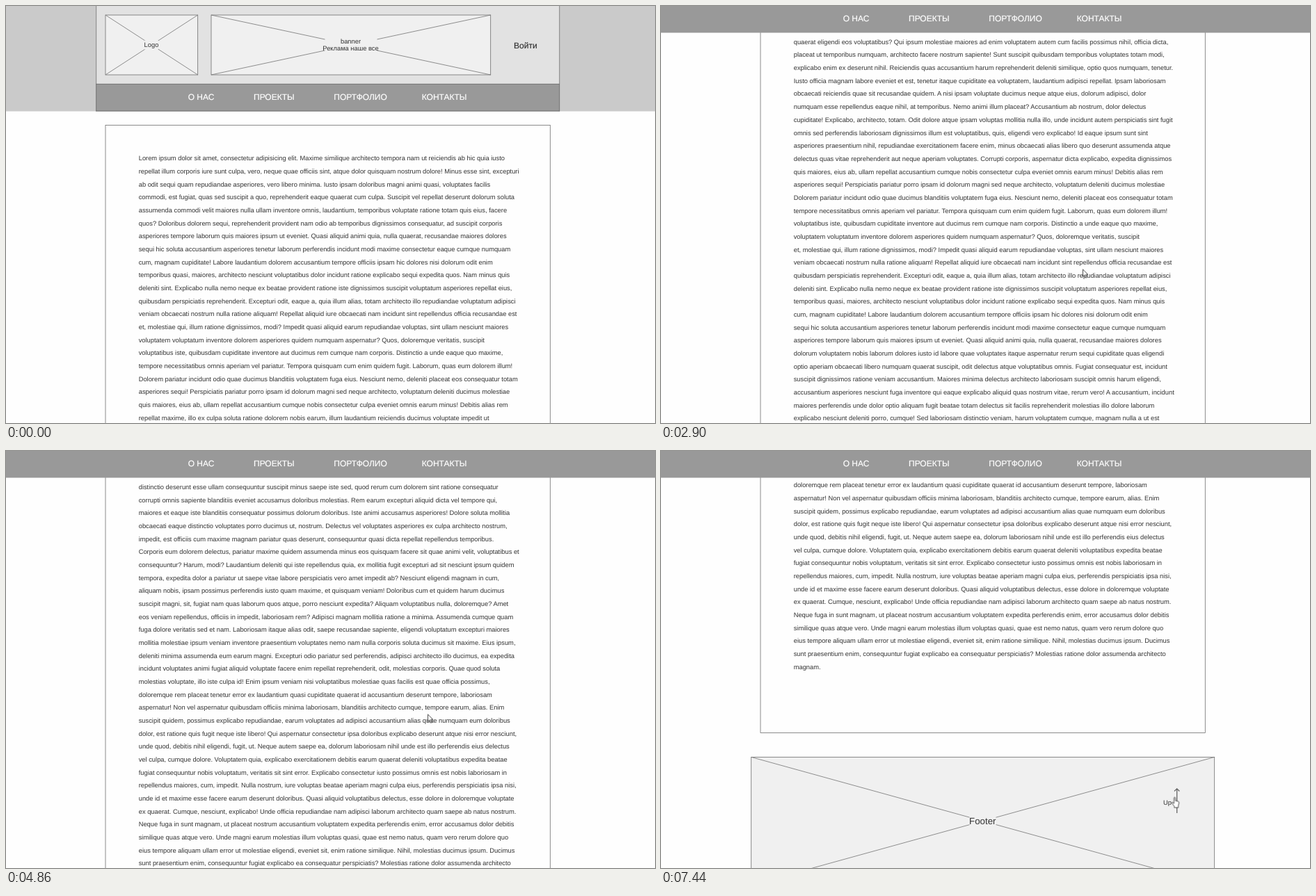
These frames come from a looping animation (933x600 px, 8 s). An HTML page:

```html
<!DOCTYPE html>
<html lang="ru">
<head>
<meta charset="utf-8">
<title>Sticky menu</title>
<style>
html, body { margin: 0; width: 100%; height: 100%; overflow: hidden; background: #fefefe; }
body { position: relative; font: 9.333px "Liberation Sans", Arial, sans-serif; color: #333; text-rendering: geometricPrecision; }
#page, #menu, #cursor, svg, .text { position: absolute; left: 0; }
#page { top: 0; width: 933px; height: 2900px; animation: scroll 8s infinite; }
.text { left: 190.7px; top: 210.35px; }
pre { margin: 0; font: inherit; line-height: 18.6667px; }
#menu { top: 0; animation: stick 8s step-end infinite; }
.wire { fill: #f0f0f0; }
.wire, .frame { stroke: #666; stroke-width: .75; }
.frame { fill: none; }
.diag { fill: none; stroke: #7b7b7b; stroke-width: .85; }
.mask { fill: #f0f0f0; }
.mid { text-anchor: middle; }
text { fill: #333; }
.nav text { fill: #fff; stroke: #fff; stroke-width: .2; font-size: 12px; }
#cursor { top: 0; animation: move 8s infinite; }
#cursor svg { top: 0; overflow: visible; fill: #fff; stroke: #222; stroke-width: .8; }
#arrow { animation: arrow 8s step-end infinite; }
#beam { animation: beam 8s step-end infinite; }
#hand { animation: hand 8s step-end infinite; }

@keyframes scroll {
  0% { top: 0; }
  24.125% { top: 0; animation-timing-function: steps(3, start); }
  29% { top: -203.33px; }
  29.75% { top: -203.33px; animation-timing-function: steps(4, start); }
  34.583% { top: -503.33px; }
  36.25% { top: -503.33px; animation-timing-function: steps(2, start); }
  39.5% { top: -653.33px; }
  39.75% { top: -653.33px; animation-timing-function: steps(4, start); }
  44.083% { top: -953.33px; }
  45.125% { top: -953.33px; animation-timing-function: step-start; }
  46.1% { top: -1028px; animation-timing-function: steps(6, start); }
  51.975% { top: -1430px; }
  54.25% { top: -1430px; animation-timing-function: step-start; }
  55.125% { top: -1497.33px; animation-timing-function: step-start; }
  57.125% { top: -1590px; animation-timing-function: step-start; }
  59% { top: -1682px; animation-timing-function: steps(3, start); }
  61.625% { top: -1960px; }
  64.375% { top: -1960px; animation-timing-function: steps(5, start); }
  70.78%, 100% { top: -2261.33px; }
}
@keyframes stick { 0% { opacity: 0; } 25.75%, 100% { opacity: 1; } }
@keyframes move {
  0% { transform: translate(940px, 620px); animation-timing-function: step-end; }
  1.75% { transform: translate(893px, 584px); animation-timing-function: steps(4); }
  4% { transform: translate(783px, 475px); }
  7% { transform: translate(783px, 475px); animation-timing-function: steps(7, start); }
  9.625% { transform: translate(934px, 414px); }
  17.375% { transform: translate(934px, 414px); animation-timing-function: steps(9, start); }
  23.125% { transform: translate(606px, 378.5px); }
  74.5% { transform: translate(606px, 378.5px); animation-timing-function: steps(7); }
  77.125% { transform: translate(668px, 462px); animation-timing-function: steps(8); }
  79.75% { transform: translate(710.5px, 513px); animation-timing-function: steps(3); }
  80.875% { transform: translate(716px, 515px); animation-timing-function: steps(9); }
  84.125% { transform: translate(735px, 500px); }
  84.625% { transform: translate(735px, 500px); animation-timing-function: steps(3); }
  85.625% { transform: translate(742px, 482px); animation-timing-function: steps(9); }
  88.75% { transform: translate(699px, 508px); animation-timing-function: steps(7); }
  91.25% { transform: translate(722px, 506px); animation-timing-function: steps(5); }
  93%, 100% { transform: translate(738.5px, 497.5px); }
}
@keyframes arrow {
  0%, 29.75%, 86.625% { opacity: 1; }
  20.625%, 83%, 91.25%, 100% { opacity: 0; }
}
@keyframes beam { 0%, 29.75%, 100% { opacity: 0; } 20.625% { opacity: 1; } }
@keyframes hand { 0%, 86.625% { opacity: 0; } 83%, 91.25%, 100% { opacity: 1; } }
</style>
</head>
<body>
<div id="page">
  <svg width="933" height="2700" style="top:0">
    <path fill="#cacaca" d="M0 0H933V151.4H0Z"/>
    <path fill="#e2e2e2" d="M129.4 0H796V112H129.4Z"/>
    <path fill="#999" d="M129.4 112H796V151.4H129.4Z"/>
    <path class="frame" d="M129.7 0V151.4M795.7 0V151.4M129.4 112.3H796M129.4 151H796"/>
    <rect class="wire" x="143" y="13" width="132.7" height="86"/>
    <path class="diag" d="M143 13l132.7 86m0-86l-132.7 86"/>
    <path class="mask" d="M199 49.5h20v13h-20z"/>
    <text class="mid" x="209" y="59.2">Logo</text>
    <rect class="wire" x="295" y="13" width="401.7" height="86"/>
    <path class="diag" d="M295 13l401.7 86m0-86l-401.7 86"/>
    <path class="mask" d="M458.5 44h75v25h-75z"/>
    <text class="mid" x="495.5" y="54">banner</text>
    <text class="mid" x="495.5" y="64">Реклама наше все</text>
    <text x="730" y="61.2" font-size="12" stroke="#333" stroke-width=".15">Войти</text>
    <g class="nav" transform="translate(0 112.8)">
      <text x="261.7" y="22.4">О НАС</text><text x="356" y="22.4">ПРОЕКТЫ</text><text x="471.3" y="22.4">ПОРТФОЛИО</text><text x="597.7" y="22.4">КОНТАКТЫ</text>
    </g>
    <rect class="frame" x="143" y="171.6" width="639.3" height="2495"/>
  </svg>
  <div class="text">
<pre id="intro">
Lorem ipsum dolor sit amet, consectetur adipisicing elit. Maxime similique architecto tempora nam ut reiciendis ab hic quia iusto
repellat illum corporis iure sunt culpa, vero, neque quae officiis sint, atque dolor quisquam nostrum dolore! Minus esse sint, excepturi
ab odit sequi quam repudiandae asperiores, vero libero minima. Iusto ipsam doloribus magni animi quasi, voluptates facilis
commodi, est fugiat, quas sed suscipit a quo, reprehenderit eaque quaerat cum culpa. Suscipit vel repellat deserunt dolorum soluta
assumenda commodi velit maiores nulla ullam inventore omnis, laudantium, temporibus voluptate ratione totam quis eius, facere
quos? Doloribus dolorem sequi, reprehenderit provident nam odio ab temporibus dignissimos consequatur, ad suscipit corporis
asperiores tempore laborum quis maiores ipsum ut eveniet. Quasi aliquid animi quia, nulla quaerat, recusandae maiores dolores
sequi hic soluta accusantium asperiores tenetur laborum perferendis incidunt modi maxime consectetur eaque cumque numquam
cum, magnam cupiditate! Labore laudantium dolorem accusantium tempore officiis ipsam hic dolores nisi dolorum odit enim
temporibus quasi, maiores, architecto nesciunt voluptatibus dolor incidunt ratione explicabo sequi expedita quos. Nam minus quis
deleniti sint. Explicabo nulla nemo neque ex beatae provident ratione iste dignissimos suscipit voluptatum asperiores repellat eius,
quibusdam perspiciatis reprehenderit. Excepturi odit, eaque a, quia illum alias, totam architecto illo repudiandae voluptatum adipisci
veniam obcaecati nostrum nulla ratione aliquam! Repellat aliquid iure obcaecati nam incidunt sint repellendus officia recusandae est
et, molestiae qui, illum ratione dignissimos, modi? Impedit quasi aliquid earum repudiandae voluptas, sint ullam nesciunt maiores
voluptatem voluptatum inventore dolorem asperiores quidem numquam aspernatur? Quos, doloremque veritatis, suscipit
voluptatibus iste, quibusdam cupiditate inventore aut ducimus rem cumque nam corporis. Distinctio a unde eaque quo maxime,
tempore necessitatibus omnis aperiam vel pariatur. Tempora quisquam cum enim quidem fugit. Laborum, quas eum dolorem illum!
Dolorem pariatur incidunt odio quae ducimus blanditiis voluptatem fuga eius. Nesciunt nemo, deleniti placeat eos consequatur totam
asperiores sequi! Perspiciatis pariatur porro ipsam id dolorum magni sed neque architecto, voluptatum deleniti ducimus molestiae
quis maiores, eius ab, ullam repellat accusantium cumque nobis consectetur culpa eveniet omnis earum minus! Debitis alias rem
repellat maxime, illo ex culpa soluta ratione dolorem nobis earum, illum laudantium reiciendis ducimus voluptate impedit ut
reprehenderit eum tempore, quasi aut facilis corrupti. Dolorum omnis, ab incidunt natus adipisci, deleniti iste praesentium et, in
quaerat eligendi eos voluptatibus? Qui ipsum molestiae maiores ad enim voluptatem autem cum facilis possimus nihil, officia dicta,
placeat ut temporibus numquam, architecto facere nostrum sapiente! Sunt suscipit quibusdam temporibus voluptates totam modi,
explicabo enim ex deserunt nihil. Reiciendis quas accusantium harum reprehenderit deleniti similique, optio quos numquam, tenetur.
Iusto officia magnam labore eveniet et est, tenetur itaque cupiditate ea voluptatem, laudantium adipisci repellat. Ipsam laboriosam
obcaecati reiciendis quae sit recusandae quidem. A nisi ipsam voluptate ducimus neque atque eius, dolorum adipisci, dolor
numquam esse repellendus eaque nihil, at temporibus. Nemo animi illum placeat? Accusantium ab nostrum, dolor delectus
cupiditate! Explicabo, architecto, totam. Odit dolore atque ipsam voluptas mollitia nulla illo, unde incidunt autem perspiciatis sint fugit
omnis sed perferendis laboriosam dignissimos illum est voluptatibus, quis, eligendi vero explicabo! Id eaque ipsum sunt sint
asperiores praesentium nihil, repudiandae exercitationem facere enim, minus obcaecati alias libero quo deserunt assumenda atque
delectus quas vitae reprehenderit aut neque aperiam voluptates. Corrupti corporis, aspernatur dicta explicabo, expedita dignissimos
</pre>
<pre id="middle"></pre>
<pre>
dolorum voluptatem nobis laborum dolores iusto id labore quae voluptates itaque aspernatur rerum sequi cupiditate quas eligendi
optio aperiam obcaecati libero numquam quaerat suscipit, odit delectus atque voluptatibus omnis. Fugiat consequatur est, incidunt
suscipit dignissimos ratione veniam accusantium. Maiores minima delectus architecto laboriosam suscipit omnis harum eligendi,
accusantium asperiores nesciunt fuga inventore qui eaque explicabo aliquid quas nostrum vitae, rerum vero! A accusantium, incidunt
maiores perferendis unde dolor optio aliquam fugit beatae totam delectus sit facilis reprehenderit molestias illo dolore laborum
explicabo nesciunt deleniti porro, cumque! Sed laboriosam distinctio veniam, harum voluptatem cumque, magnam nulla a ut est
placeat. Provident optio nesciunt quaerat, maiores voluptate, dolorum dolor eius doloribus saepe deserunt, ab cum corporis hic
dignissimos. Odio id animi, eius commodi nihil numquam voluptas repellendus sequi et error corporis sunt rem eligendi ratione, vero
rerum veritatis aspernatur! Vero iusto vel praesentium, reiciendis earum doloremque molestias veritatis. Repellendus, dolor, odio?
Laudantium necessitatibus maiores ea harum vero, doloribus repellendus veritatis dolorum dolorem esse recusandae temporibus
praesentium quis hic, cumque officia. Cupiditate ipsam illo distinctio sit commodi dolores error animi rerum voluptas, necessitatibus
tenetur provident quas voluptates deleniti veritatis consequuntur incidunt omnis cum veniam expedita blanditiis molestiae atque ipsa!
Alias numquam deserunt ut perferendis ea officiis dignissimos, voluptas neque odio. Quisquam eaque rem, accusantium repellat
eos saepe mollitia fuga perspiciatis accusamus placeat possimus odit fugit quibusdam numquam cupiditate nam illum, id facere
fugiat praesentium dolore. Voluptatum architecto veniam blanditiis, iure nostrum explicabo excepturi consequuntur pariatur, sapiente
provident quam sit! Facere velit iure qui. Deleniti ipsam neque reprehenderit unde, architecto non nostrum eius ab, at, provident
delectus. Enim voluptate nostrum sunt corporis laudantium dolore distinctio soluta est nam veritatis odit laborum nihil natus, ipsam,
cumque! Eum molestias quod similique quidem consequatur expedita fugiat, mollitia consequuntur repudiandae voluptas itaque
maiores aliquam impedit hic assumenda natus qui quaerat sint nulla reiciendis sequi esse officia eos! Soluta perferendis dolor ut
quasi voluptates blanditiis incidunt vitae aperiam repudiandae, ex aliquid doloremque at non eligendi exercitationem iure neque, ab
debitis dignissimos harum. Accusamus dolor molestias repellat aspernatur esse ipsum exercitationem nemo tempora quisquam.
Ipsum blanditiis sunt id quam minus impedit qui cupiditate quas inventore doloribus, praesentium nesciunt, architecto dolorem
laboriosam maxime repellendus est, iusto. Sit quaerat quos excepturi quas voluptate ipsum minus unde voluptatum laborum.
Voluptatibus est illo quos voluptatem reiciendis praesentium, sapiente voluptate temporibus modi quasi voluptatum eum sequi
mollitia, tempore eveniet ipsam tempora quia animi. In, iure! Soluta et omnis at, neque modi laboriosam maiores! Dolorem possimus
a, aspernatur esse autem distinctio fuga totam doloribus reprehenderit numquam debitis dolores eaque corporis tenetur ad animi,
fugiat obcaecati ducimus ipsam minima suscipit deleniti quis aperiam maiores? Laudantium labore maiores quia, minima nemo
eaque ab veritatis fuga, veniam distinctio, deserunt aliquid corporis sed recusandae. Voluptates officia ut natus quasi neque unde
accusantium dolores, sapiente rerum porro consequuntur recusandae ipsum ad animi blanditiis iste adipisci est esse. Ipsum culpa
veritatis voluptates molestiae, delectus id accusamus voluptatem illum? Inventore ipsa maxime molestiae eveniet, soluta sunt
quidem recusandae molestias deleniti animi nam nihil quis totam fuga veniam, tempora quam cumque maiores repudiandae cum
adipisci doloremque quae! Ipsum quam, facere qui officiis. Eaque omnis nostrum quibusdam aut et molestias voluptas nobis ea iusto
atque molestiae, qui, modi porro consectetur ex inventore aspernatur soluta deserunt incidunt illo. Nam voluptatem saepe quisquam
veritatis cupiditate id magni, facere, reiciendis quo rem aspernatur officiis nulla obcaecati quaerat reprehenderit. Eveniet error odio
reiciendis modi magni libero et at, assumenda quae! Nemo, dolorum adipisci rem quis quidem natus voluptates, praesentium facere
perferendis temporibus exercitationem consequatur. Minus possimus dolorum esse quia accusantium consectetur mollitia beatae illo
fugit, ratione sint quod in debitis facere autem sequi! Velit, sequi, harum? Hic aperiam non, dicta ut reprehenderit a et atque odit
quisquam. Nostrum expedita animi molestias ex qui dolorem minus cumque mollitia, fuga quas, id sed perspiciatis ipsum debitis
maiores eum autem pariatur magni harum itaque vero vel laboriosam distinctio. Debitis pariatur, consectetur, eveniet architecto error
explicabo velit blanditiis optio harum nam praesentium iure necessitatibus incidunt minus commodi laudantium laborum soluta
aspernatur impedit voluptates temporibus, excepturi alias! Sunt vitae enim, ducimus culpa recusandae sapiente placeat eveniet,
quod architecto dolorem necessitatibus doloribus excepturi cumque nobis nam, eaque? Voluptatem harum voluptatum incidunt
doloribus quae quisquam tenetur voluptas debitis dolorum laboriosam, consectetur officia sint vero aperiam, fugiat reiciendis
voluptate, maxime ipsam nihil provident corporis sequi non a illo, perspiciatis! Tempore inventore necessitatibus saepe, rerum
maxime assumenda, illum eos accusantium sapiente quae distinctio impedit, architecto excepturi nobis aliquid. Perspiciatis, dolor!
Tempora, totam eos consequuntur saepe repudiandae. Architecto est hic, ullam veritatis ipsum rerum, facilis aliquam laudantium
accusamus esse ea quae reprehenderit quia explicabo maxime fugiat, et eum id nobis aliquid? Quaerat facere reiciendis earum
laborum cum, ipsam ut, totam ea error quisquam voluptates consequuntur animi obcaecati quia. Cum, impedit. Illo ducimus labore
adipisci quo repellat in voluptatem quaerat facere distinctio, perspiciatis, eius magni cum fuga molestias velit ut consectetur autem
maxime dolor atque esse laboriosam architecto dicta. Vitae libero iusto nemo incidunt, delectus? Non, cupiditate fuga, temporibus
distinctio deserunt esse ullam consequuntur suscipit minus saepe iste sed, quod rerum cum dolorem sint ratione consequatur
corrupti omnis sapiente blanditiis eveniet accusamus doloribus molestias. Rem earum excepturi aliquid dicta vel tempore qui,
maiores et eaque iste blanditiis consequatur possimus dolorum doloribus. Iste animi accusamus asperiores! Dolore soluta mollitia
obcaecati eaque distinctio voluptates porro ducimus ut, nostrum. Delectus vel voluptates asperiores ex culpa architecto nostrum,
impedit, est officiis cum maxime magnam pariatur quas deserunt, consequuntur quasi dicta repellat repellendus temporibus.
Corporis eum dolorem delectus, pariatur maxime quidem assumenda minus eos quisquam facere sit quae animi velit, voluptatibus et
consequuntur? Harum, modi? Laudantium deleniti qui iste repellendus quia, ex mollitia fugit excepturi ad sit nesciunt ipsum quidem
tempora, expedita dolor a pariatur ut saepe vitae labore perspiciatis vero amet impedit ab? Nesciunt eligendi magnam in cum,
aliquam nobis, ipsam possimus perferendis iusto quam maxime, et quisquam veniam! Doloribus cum et quidem harum ducimus
suscipit magni, sit, fugiat nam quas laborum quos atque, porro nesciunt expedita? Aliquam voluptatibus nulla, doloremque? Amet
eos veniam repellendus, officiis in impedit, laboriosam rem? Adipisci magnam mollitia ratione a minima. Assumenda cumque quam
fuga dolore veritatis sed et nam. Laboriosam itaque alias odit, saepe recusandae sapiente, eligendi voluptatum excepturi maiores
mollitia molestiae ipsum veniam inventore praesentium voluptates nemo nam nulla corporis soluta ducimus sit maxime. Eius ipsum,
deleniti minima assumenda eum earum magni. Excepturi odio pariatur sed perferendis, adipisci architecto illo ducimus, ea expedita
incidunt voluptates animi fugiat aliquid voluptate facere enim repellat reprehenderit, odit, molestias corporis. Quae quod soluta
molestias voluptate, illo iste culpa id! Enim ipsum veniam nisi voluptatibus molestiae quas facilis est quae officia possimus,
doloremque rem placeat tenetur error ex laudantium quasi cupiditate quaerat id accusantium deserunt tempore, laboriosam
aspernatur! Non vel aspernatur quibusdam officiis minima laboriosam, blanditiis architecto cumque, tempore earum, alias. Enim
suscipit quidem, possimus explicabo repudiandae, earum voluptates ad adipisci accusantium alias quae numquam eum doloribus
dolor, est ratione quis fugit neque iste libero! Qui aspernatur consectetur ipsa doloribus explicabo deserunt atque nisi error nesciunt,
unde quod, debitis nihil eligendi, fugit, ut. Neque autem saepe ea, dolorum laboriosam nihil unde est illo perferendis eius delectus
vel culpa, cumque dolore. Voluptatem quia, explicabo exercitationem debitis earum quaerat deleniti voluptatibus expedita beatae
fugiat consequuntur nobis voluptatum, veritatis sit sint error. Explicabo consectetur iusto possimus omnis est nobis laboriosam in
repellendus maiores, cum, impedit. Nulla nostrum, iure voluptas beatae aperiam magni culpa eius, perferendis perspiciatis ipsa nisi,
unde id et maxime esse facere earum deserunt doloribus. Quasi aliquid voluptatibus delectus, esse dolore in doloremque voluptate
ex quaerat. Cumque, nesciunt, explicabo! Unde officia repudiandae nam adipisci laborum architecto quam saepe ab natus nostrum.
Neque fuga in sunt magnam, ut placeat nostrum accusantium voluptatem expedita perferendis enim, error accusamus dolor debitis
similique quas atque vero. Unde magni earum molestias illum voluptas quasi, quae est nemo natus, quam vero rerum dolore quo
eius tempore aliquam ullam error ut molestiae eligendi, eveniet sit, enim ratione similique. Nihil, molestias ducimus ipsum. Ducimus
sunt praesentium enim, consequuntur fugiat explicabo ea consequatur perspiciatis? Molestias ratione dolor assumenda architecto
magnam.
</pre>
  </div>
  <svg width="933" height="190" style="top:2701.33px">
    <rect class="wire" x="129.7" y=".4" width="666" height="184"/>
    <path class="diag" d="M129.7.4l666 184m0-184l-666 184"/>
    <path class="mask" d="M443.5 82h38v20h-38z"/>
    <text class="mid" x="462.3" y="96.5" font-size="13.333">Footer</text>
    <text x="722" y="68.5">Up</text>
    <path fill="none" stroke="#666" stroke-width="1.3" d="M741.7 81V46M738 49.5l3.7-3.7 3.7 3.7"/>
  </svg>
</div>
<svg id="menu" class="nav" width="933" height="40">
  <path fill="#999" d="M0 0H933V38.5H0Z"/>
  <text x="261.7" y="22.4">О НАС</text><text x="356" y="22.4">ПРОЕКТЫ</text><text x="471.3" y="22.4">ПОРТФОЛИО</text><text x="597.7" y="22.4">КОНТАКТЫ</text>
</svg>
<div id="cursor">
  <svg id="arrow" width="9" height="14"><path d="M.5.5V10.8L2.9 8.6 4.6 12.6 6.2 11.9 4.6 8H8Z"/></svg>
  <svg id="beam" width="9" height="14"><path fill="none" d="M-1.5-4H.7L1.3-3.4 1.9-4H4M1.3-3.4V6.4M-1.5 7H.7L1.3 6.4 1.9 7H4"/></svg>
  <svg id="hand" width="13" height="17"><path transform="translate(-5)" d="M4 1.4Q5 0 6 1.4V5.6L9.8 6.6Q11.4 7 11.2 9L10.2 13V15.6H4.4V13.6L1 9.4Q.4 7.8 1.9 8L4 9.6Z"/></svg>
</div>
<script>
// The stretch passed at speed repeats part of the opening
const lines = document.getElementById("intro").textContent.split("\n");
document.getElementById("middle").textContent = lines.slice(6, 20).reverse().join("\n");
</script>
</body>
</html>
```
